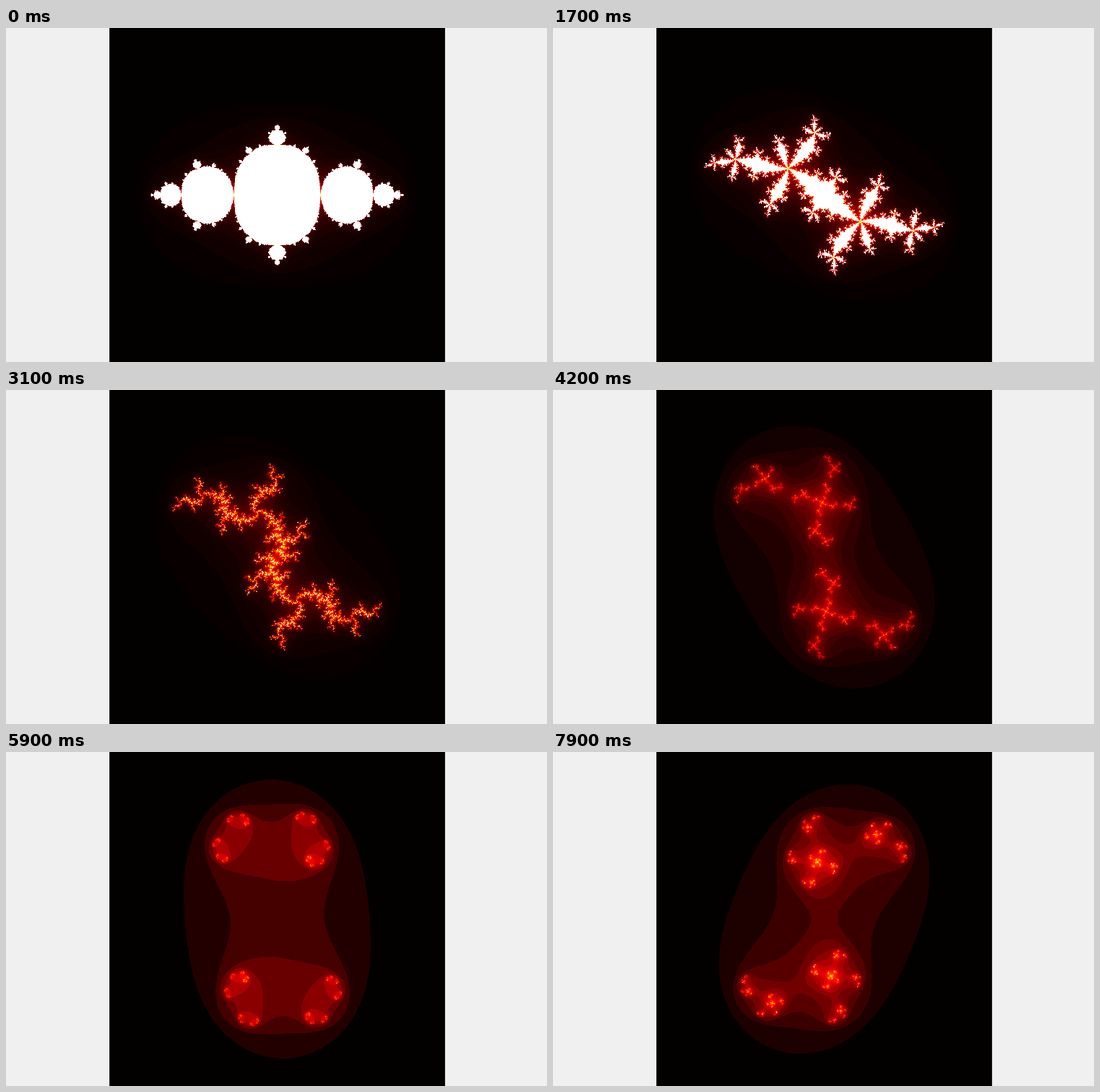
Write an HTML page with a canvas that moves like this. It is 749 px wide and 463 px high and loops after 8000 ms.

```html
<!DOCTYPE html>
<html lang="en">
<head>
<meta charset="utf-8">
<title>Julia set</title>
<style>
  html, body { margin: 0; width: 100%; height: 100%; overflow: hidden; background: #f0f0f0; }
  canvas { position: absolute; left: 143px; top: 0; display: block; }
</style>
</head>
<body>
<canvas id="plot" width="465" height="463"></canvas>
<script>
const STEP_MS = 100, STEPS = 80;
const RADIUS = 0.7885, TURN = 0.05;
const MAX_ITER = 100, EXTENT = 2;
const GRID = 1000, SIDE = 464;   // samples and pixels along one side of the plot

const canvas = document.getElementById('plot');
const ctx = canvas.getContext('2d');
const W = canvas.width, H = canvas.height;
const image = ctx.createImageData(W, H);
const pixels = new Uint32Array(image.data.buffer);
const counts = new Uint8Array(GRID * GRID);
const axis = Array.from({ length: GRID }, (_, i) => (i / (GRID - 1) * 2 - 1) * EXTENT);

// Black, red, yellow, white in 256 shades
function hot(v) {
  const shade = Math.min(255, Math.floor(v * 256)) + 1;
  const ramp = (from, to) => Math.round(255 * Math.min(1, Math.max(0, (shade - from) / (to - from))));
  const r = ramp(0, 96), g = ramp(96, 192), b = ramp(192, 256);
  return (255 << 24 | b << 16 | g << 8 | r) >>> 0;
}

function escapeCount(x, y, cx, cy) {
  let n = 0;
  while (n < MAX_ITER) {
    const nx = x * x - y * y + cx;
    y = 2 * x * y + cy;
    x = nx;
    if (x * x + y * y >= 4) break;
    n++;
  }
  return n;
}

// The set is symmetric under z -> -z, so half the grid is enough
function sample(cx, cy) {
  const total = GRID * GRID;
  let peak = 1;
  for (let row = 0, i = 0; row < GRID / 2; row++) {
    for (let col = 0; col < GRID; col++, i++) {
      const n = escapeCount(axis[col], axis[row], cx, cy);
      counts[i] = counts[total - 1 - i] = n;
      if (n > peak) peak = n;
    }
  }
  return peak;
}

// Nearest sample for a pixel of a plot centred on the canvas
function nearest(p, size) {
  const pos = (p + 0.5 - size / 2) / SIDE + 0.5;
  return Math.min(GRID - 1, Math.floor(pos * GRID));
}
const cols = Array.from({ length: W }, (_, p) => nearest(p, W));
const rows = Array.from({ length: H }, (_, p) => nearest(p, H));

function draw(step) {
  const angle = Math.PI + TURN * step;
  const peak = sample(RADIUS * Math.cos(angle), RADIUS * Math.sin(angle));
  // Colours span the highest count present
  const palette = Array.from({ length: peak + 1 }, (_, n) => hot(n / peak));
  for (let y = 0, i = 0; y < H; y++) {
    for (let x = 0; x < W; x++) pixels[i++] = palette[counts[rows[y] * GRID + cols[x]]];
  }
  ctx.putImageData(image, 0, 0);
  // Axis lines
  ctx.fillStyle = '#262626';
  ctx.fillRect(0, 0, 1, H);
  ctx.fillRect(W - 1, 0, 1, H);
}

let shown = -1;
const start = performance.now();
function tick() {
  const step = Math.floor(Math.max(0, performance.now() - start) / STEP_MS) % STEPS;
  if (step !== shown) {
    draw(step);
    shown = step;
  }
  requestAnimationFrame(tick);
}
tick();
</script>
</body>
</html>
```
